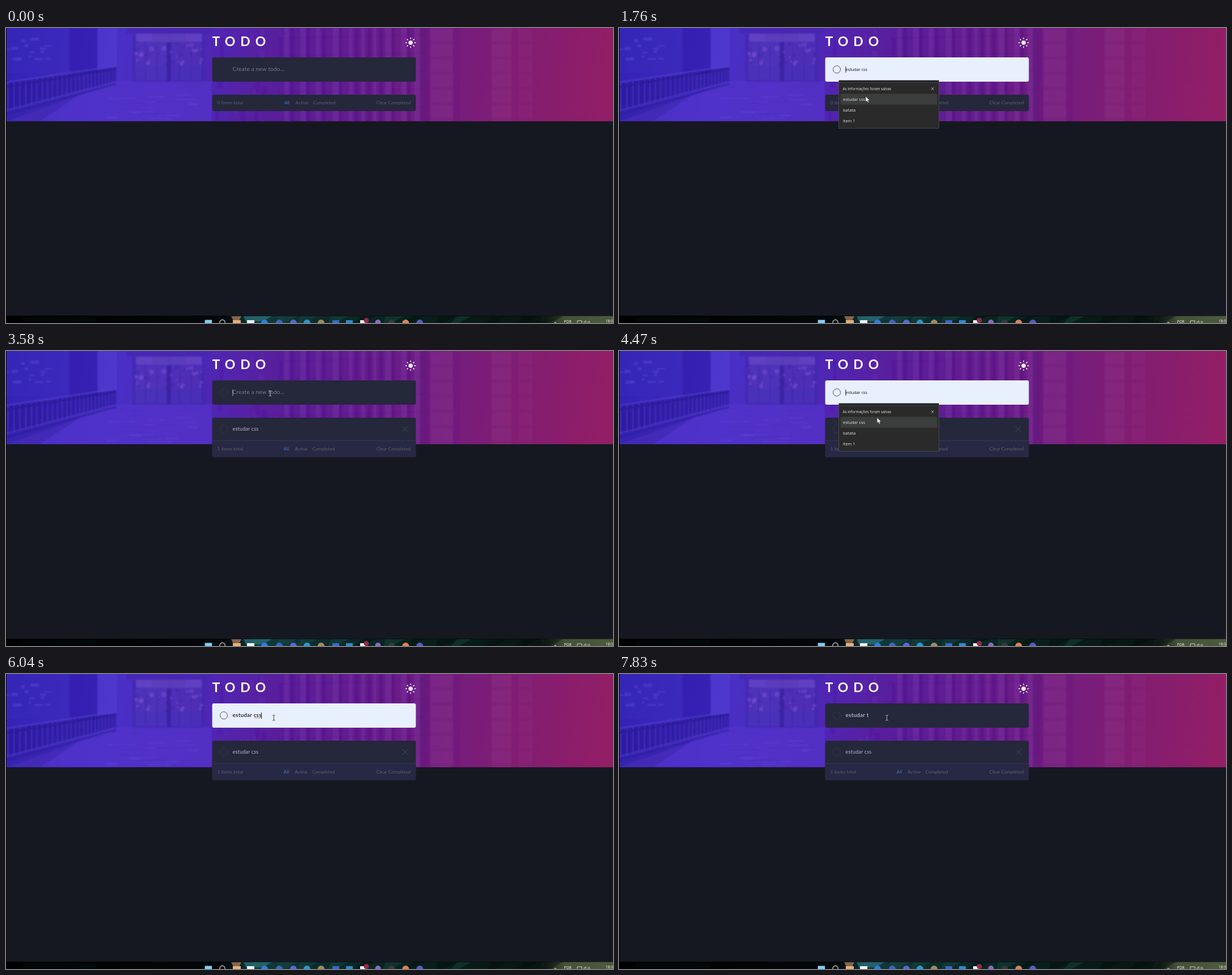
Recreate the animation shown at these times as an HTML page. Size 1073 px wide and 522 px high, loop 8000 ms.

```html
<!DOCTYPE html>
<html lang="pt">
<head>
<meta charset="utf-8">
<title>Todo</title>
<style>
html, body { margin: 0; width: 100%; height: 100%; overflow: hidden; background: #161821; }
svg { display: block; width: 1073px; height: 522px; }
text { font-family: Lato, sans-serif; white-space: pre; }
.title { font-size: 23px; font-weight: 700; letter-spacing: 9px; fill: #fff; }
.field { font-size: 10px; letter-spacing: .2px; }
.item { font-size: 9px; letter-spacing: .16px; fill: #b4b7d0; }
.foot { font-size: 8px; letter-spacing: .13px; fill: #5f6178; }
.foot .on { fill: #3f78d4; }
.menu text { font-family: "Open Sans", "Noto Sans", sans-serif; font-size: 7.4px; fill: #e4e4e4; }
.menu .head { font-size: 6.45px; }
.bar text { font-family: "Open Sans", sans-serif; font-size: 6.5px; fill: #fff; }
</style>
</head>
<body>
<svg id="stage" viewBox="0 0 1073 522">
  <defs>
    <linearGradient id="hue" gradientUnits="userSpaceOnUse" x1="0" y1="0" x2="1060" y2="130">
      <stop offset="0" stop-color="#3322b4"/>
      <stop offset=".18" stop-color="#472cc6"/>
      <stop offset=".34" stop-color="#5026b4"/>
      <stop offset=".45" stop-color="#591e9c"/>
      <stop offset=".6" stop-color="#651d8e"/>
      <stop offset=".7" stop-color="#711d82"/>
      <stop offset=".85" stop-color="#811d72"/>
      <stop offset="1" stop-color="#921e66"/>
    </linearGradient>
    <linearGradient id="wall" x1="0" y1="0" x2="1" y2="0">
      <stop offset="0" stop-color="#000"/>
      <stop offset=".36" stop-color="#03080a"/>
      <stop offset=".41" stop-color="#123c40"/>
      <stop offset=".5" stop-color="#0c2c2c"/>
      <stop offset=".68" stop-color="#08201c"/>
      <stop offset=".88" stop-color="#081512"/>
      <stop offset=".92" stop-color="#445238"/>
      <stop offset="1" stop-color="#4c5a3c"/>
    </linearGradient>
    <filter id="soft" x="0" y="0" width="1" height="1"><feGaussianBlur stdDeviation="1.2"/></filter>
    <clipPath id="banner"><rect x="1" width="1072" height="165"/></clipPath>
  </defs>

  <rect width="1073" height="522" fill="#161821"/>
  <g clip-path="url(#banner)">
    <rect width="1073" height="165" fill="url(#hue)"/>
    <g id="scene" filter="url(#soft)"></g>
  </g>
  <rect width="1" height="522"/>
  <g class="bar" id="bar"></g>

  <text class="title" x="364.5" y="31.5">TODO</text>
  <g id="sun" stroke="#fff" stroke-width="1.5" stroke-linecap="round"><circle cx="715.2" cy="26" r="3.8" fill="#fff" stroke="none"/></g>

  <rect id="box" x="364.5" y="52" width="360" height="43" rx="3"/>
  <circle id="ring" cx="385" cy="73.3" r="6.5" fill="none" stroke-width=".9"/>
  <text id="value" class="field" x="400.6" y="76.2"></text>
  <path id="wave" d="M439 78.3l1.5-1.3 1.5 1.3 1.5-1.3 1.5 1.3 1.5-1.3 1.5 1.3 1.5-1.3 1.5 1.3" fill="none" stroke="#d8403c" stroke-width=".8"/>
  <rect id="caret" y="68" width=".9" height="11"/>

  <rect id="panel" x="364.5" y="118" width="360" height="29" rx="3" fill="#25273b"/>
  <g id="row">
    <path d="M364.5 158.4h360V185a3 3 0 0 1-3 3h-354a3 3 0 0 1-3-3z" fill="#272843"/>
    <circle cx="385" cy="138" r="6.5" fill="none" stroke="#34364c" stroke-width=".9"/>
    <text class="item" x="400.6" y="141">estudar css</text>
    <path d="M701 133.3l9.6 9.6m0-9.6l-9.6 9.6" stroke="#4c4f6a" stroke-width=".8"/>
    <path d="M364.5 158.4h360" stroke="#3a3c56" stroke-width=".9"/>
  </g>
  <g class="foot" id="foot">
    <text id="count" x="373.6" y="134.6"></text>
    <g id="tabs">
      <text class="on" x="492" y="134.6">All</text>
      <text x="511.8" y="134.6">Active</text>
      <text x="543" y="134.6">Completed</text>
    </g>
    <text x="654.8" y="134.6">Clear Completed</text>
  </g>

  <g class="menu" id="menu">
    <path d="M388.5 96.5v-4h177v4z" fill="#1e1f22"/>
    <rect id="sheet" x="388.5" y="96" width="177" fill="#292a29" stroke="#505150" stroke-width=".8"/>
    <path d="M396 96l4-3 4 3z" fill="#292a29"/>
    <text class="head" x="395.4" y="109.6">As informações foram salvas</text>
    <path d="M552 105.3l4.4 4.4m0-4.4l-4.4 4.4" stroke="#e4e4e4" stroke-width=".8"/>
    <rect id="hover" x="391.5" y="116.5" width="171" height="19" rx="1.5" fill="#3c3d3d"/>
    <text x="396" y="128.7">estudar css</text>
    <g id="more">
      <text x="396" y="147.7">batata</text>
      <text x="396" y="166.8">item 1</text>
    </g>
  </g>

  <g id="mouse">
    <circle id="press" r="7" fill="#c4b516" opacity=".82"/>
    <path id="arrow" d="M0 0v9.6l2.3-2.1 1.6 3.6 1.7-.8-1.6-3.4h3z" fill="#fff" stroke="#111" stroke-width=".4"/>
    <path id="beam" d="M-2.4-4.5h1.8l.6.5.6-.5h1.8M0-4v8M-2.4 4.5h1.8l.6-.5.6.5h1.8" fill="none" stroke-width=".9"/>
  </g>
</svg>
<script>
const $ = id => document.getElementById(id);
const set = (id, attrs) => { for (const k in attrs) $(id).setAttribute(k, attrs[k]); };
const show = (id, on) => { $(id).style.display = on ? '' : 'none'; };
const rect = (x, y, w, h, fill, o = 1) =>
  `<rect x="${x}" y="${y}" width="${w}" height="${h}" fill="${fill}" opacity="${o}"/>`;
const line = (d, stroke, w, o = 1) =>
  `<path d="${d}" fill="none" stroke="${stroke}" stroke-width="${w}" opacity="${o}"/>`;
const shape = (d, fill, o = 1) => `<path d="${d}" fill="${fill}" opacity="${o}"/>`;
const dot = (x, y, r, fill, o = 1) => `<circle cx="${x}" cy="${y}" r="${r}" fill="${fill}" opacity="${o}"/>`;

let seed = 11;
const rnd = (a, b) => {
  seed = (seed * 16807) % 2147483647;
  return +(a + (b - a) * seed / 2147483647).toFixed(1);
};

function drawScene() {
  let s = '';
  // hazy street and light shaft on the left
  s += rect(0, 0, 112, 80, '#3a2cba', .5) + rect(112, 0, 50, 80, '#2c1ca4', .5);
  s += rect(162, 0, 34, 72, '#5440d4', .5) + rect(196, 0, 26, 95, '#4c30c6', .5);
  for (let i = 0; i < 14; i++) s += rect(rnd(0, 70), rnd(16, 62), rnd(4, 16), rnd(2, 6), '#6660e0', .3);
  // walkway
  s += shape('M0 165L200 94H364V165z', '#5636cc', .65);
  s += shape('M0 165V152L130 118 60 165z', '#3420a4', .45);
  for (let i = 0; i < 26; i++) {
    const y = rnd(98, 163);
    s += rect(rnd(150, 335), y, rnd(15, 55), rnd(1, 2.5), i % 2 ? '#6c4cdc' : '#4426b0', .35);
  }
  // railing
  s += shape('M0 98L195 68V96L0 148z', '#2a1a94', .55);
  for (let x = 3, gap = 11; x < 195; x += gap, gap *= .97) {
    const p = x / 195;
    s += line(`M${x} ${98 - 30 * p}V${148 - 52 * p}`, '#5646d4', 2.2 - p, .4);
  }
  s += line('M0 96L195 67', '#5c4cdc', 2.2, .55) + line('M0 104L195 72', '#24168a', 3, .6);
  s += line('M0 146L195 95', '#5a48d8', 2, .5) + line('M0 153L195 99', '#281890', 3, .5);
  // gate
  s += rect(213, 0, 150, 9, '#4426ac', .6) + rect(224, 9, 129, 86, '#4428b0', .85);
  s += rect(229, 10, 56, 82, '#5538be', .7) + rect(293, 10, 54, 82, '#5534ba', .7);
  s += rect(229, 66, 118, 27, '#4830b8', .7);
  for (let i = 0; i < 40; i++) s += dot(rnd(230, 346), rnd(24, 66), rnd(1.5, 4.5), i % 2 ? '#7c52d0' : '#3f28ac', .5);
  s += rect(230, 10, 116, 14, '#7050cc', .5) + rect(258, 10, 60, 15, '#5a3cba', .8);
  s += rect(284, 26, 7, 69, '#3820a0', .7);
  for (let x = 246; x < 350; x += 20) s += rect(x, 26, 1.5, 67, '#3a22a4', .5);
  // hedge and colonnade
  for (let i = 0; i < 18; i++) s += rect(rnd(362, 490), rnd(0, 140), rnd(4, 10), rnd(15, 50), i % 2 ? '#6830b8' : '#481a9c', .22);
  for (let x = 492; x < 735; x += rnd(20, 32)) {
    s += rect(x, 0, rnd(6, 11), 165, '#8a48b8', .22) + rect(x + 11, 0, 6, 165, '#45127e', .25);
  }
  for (let y = 12; y < 165; y += 32) s += line(`M480 ${y + 6}L740 ${y}`, '#45127e', 1.5, .15);
  // stacked blocks on the right
  for (const [x, w] of [[750, 40], [858, 36], [905, 26]]) {
    s += rect(x, 0, w, 165, '#a0509c', x < 860 ? .09 : .05);
    for (let y = 0; y < 165; y += 27) s += rect(x + 1, y + 2, w - 2, 21, '#a8589c', x < 860 ? .1 : .06);
  }
  s += rect(733, 0, 15, 165, '#5a1478', .2) + rect(792, 0, 10, 165, '#5a1478', .12);
  $('scene').innerHTML = s;
}

function drawBar() {
  let s = rect(0, 509, 1073, 13, '#000') + rect(1, 509.5, 1072, 12.5, 'url(#wall)');
  s += shape('M398 510h18l-4 8h-10z', '#b8845c', .7) + shape('M420 510h50l-16 9h-30z', '#2f7c86', .6);
  for (let x = 480; x < 960; x += rnd(34, 60)) {
    s += shape(`M${x} 510h${rnd(15, 35)}l-22 12h-14z`, x % 2 < 1 ? '#1a4c42' : '#040c0b', .4);
  }
  s += rect(30, 512, 130, 8, '#06191c', .3);
  s += rect(351.5, 516.5, 12.5, 6, '#7fd0f5');
  s += `<circle cx="382.5" cy="521" r="4.6" fill="none" stroke="#eee" stroke-width="1.2"/>`;
  s += rect(401, 517, 14, 5, '#e8b078') + rect(426, 517, 13, 5, '#f0f2f4');
  const round = [[457, '#2c7be0'], [483, '#3a62c4'], [508, '#5865d8'], [532, '#2a96d0'], [557, '#a08a5c'],
    [681.5, '#3a383c'], [706.5, '#e08058'], [731.5, '#5a58c4']];
  for (const [x, c] of round) s += dot(x, 522, 6, c);
  s += rect(577, 517, 12, 5, '#3468d0') + rect(601, 517, 12, 5, '#2c88d4');
  s += rect(626, 517, 10, 5, '#eceef0') + dot(637, 517.5, 4.5, '#96284a');
  s += dot(657.5, 521, 5, '#8a68c4');
  s += line('M969 522l2-1.5 2 1.5', '#fff', .9);
  s += '<text x="986.5" y="522">POR</text><text x="1060" y="521">18:04</text>';
  s += line('M1010 522v-4h8v4M1022 522v-2l3-2v4M1028 519q2 1.5 1 3M1030 518q2.5 2 1.5 4', '#ddd', .9);
  $('bar').innerHTML = s;
}

function drawSun() {
  let d = '';
  for (let i = 0; i < 8; i++) {
    const c = Math.cos(i * Math.PI / 4), s = Math.sin(i * Math.PI / 4);
    d += `M${715.2 + 6.9 * c} ${26 + 6.9 * s}L${715.2 + 8.6 * c} ${26 + 8.6 * s}`;
  }
  $('sun').innerHTML += `<path d="${d}"/>`;
}

const LOOP = 8000, FULL = 'estudar css';
// time, field text, caret x (0 = blinked off), misspelling mark
const typing = [
  [0, '', 0], [1150, '', 400.4],
  [2160, FULL, 451.2], [2790, FULL, 0], [3250, FULL, 451.2, true],
  [3580, '', 400.4], [3850, '', 0], [4120, '', 400.4],
  [4960, FULL, 451.2], [5570, FULL, 0], [6040, FULL, 451.2, true],
  [6170, 'estudar cs', 446.9], [6370, 'estudar c', 442.4], [6470, 'estudar ', 438],
  [7100, 'estudar ', 0], [7300, 'estudar t', 441.8], [7830, 'estudar t', 0]
];
// start, end, steps, from x, y, to x, y
const moves = [
  [120, 820, 10, 1031, 512, 450.5, 71.5],
  [1220, 1760, 7, 450.5, 71.5, 436, 121],
  [2160, 2520, 5, 436, 121, 467, 75],
  [4190, 4540, 5, 467, 75, 455, 123],
  [4960, 5240, 4, 455, 123, 473.5, 77.5]
];
const presses = [[1150, 1290], [2090, 2160], [4120, 4260], [4890, 4960]];
const menus = [[1220, 2160], [4190, 4960], [6170, 7300]];
const within = (list, t) => list.some(([a, b]) => t >= a && t < b);
const latest = (list, t) => list.filter(r => r[0] <= t).pop();

function pointer(t) {
  const m = latest(moves, t);
  if (!m) return null;
  const [a, b, n, x0, y0, x1, y1] = m;
  const k = Math.min(1, Math.floor((t - a) / (b - a) * n + 1e-6) / n);
  const p = k * k * (3 - 2 * k);
  return [x0 + (x1 - x0) * p, y0 + (y1 - y0) * p];
}

function render(t) {
  const [, text, caret, wave] = latest(typing, t);
  const at = pointer(t), open = within(menus, t), short = t >= 6170, listed = t >= 3580;
  const hover = open && !short && at[1] > 116.5 && at[1] < 135.5;
  const light = hover || text === FULL;

  set('box', { fill: light ? '#e8f0fe' : '#25273b' });
  show('ring', light || listed);
  set('ring', { stroke: light ? '#3c3f4c' : '#34364a' });
  const value = $('value');
  value.textContent = hover ? FULL : text || 'Create a new todo...';
  value.setAttribute('style', hover
    ? 'font:7.3px "Open Sans",sans-serif;letter-spacing:0;fill:#111'
    : `font-weight:${text ? 500 : 400};fill:${light ? '#0a0a0c' : text ? '#c8cbe0' : '#7c7d87'}`);
  show('caret', caret);
  set('caret', { x: caret, fill: light ? '#111' : '#c8cbe0' });
  show('wave', wave);

  show('row', listed);
  set('panel', { height: listed ? 70 : 29 });
  set('foot', { transform: `translate(0 ${listed ? 41.3 : 0})` });
  set('tabs', { transform: `translate(${listed ? -1.3 : 0} 0)` });
  $('count').textContent = (listed ? 1 : 0) + ' items total';

  show('menu', open);
  show('more', !short);
  show('hover', hover);
  set('sheet', { height: short ? 42.5 : 81.5 });

  show('mouse', at);
  if (at) {
    const beam = at[1] > 52 && at[1] < (open ? 92 : 95) && at[0] > 394 && at[0] < 715;
    set('mouse', { transform: `translate(${at[0]} ${at[1]})` });
    show('press', within(presses, t));
    show('arrow', !beam);
    show('beam', beam);
    set('beam', { stroke: light ? '#333' : '#c4c6d0' });
  }
}

drawScene();
drawBar();
drawSun();
const start = performance.now();
function tick() {
  render((performance.now() - start) % LOOP);
  requestAnimationFrame(tick);
}
tick();
</script>
</body>
</html>
```
